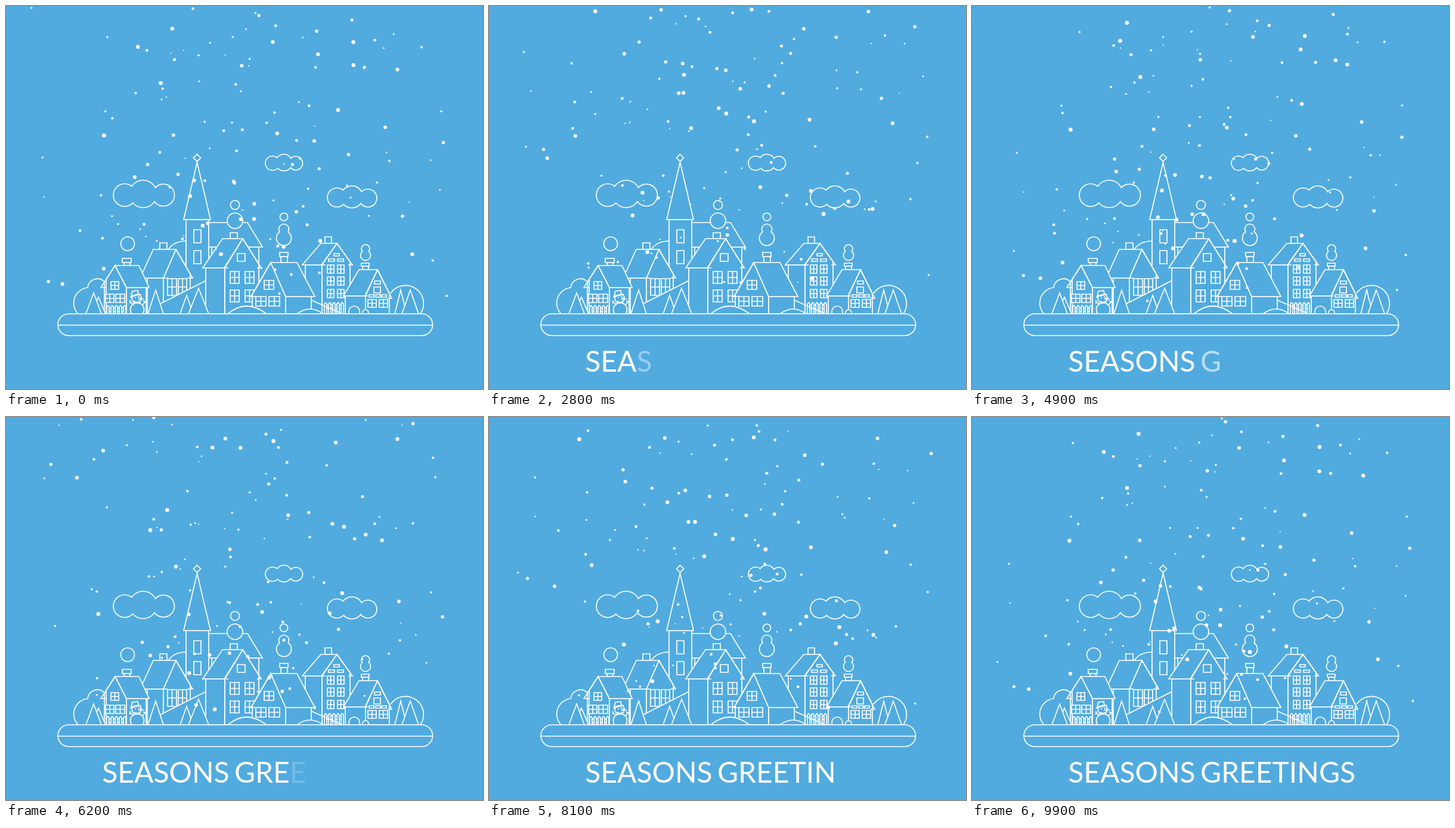
Recreate the animation shown at these times as an HTML page with a canvas. Size 800x642 px, loop 10 s.

```html
<!DOCTYPE html>
<html lang="en">
<head>
<meta charset="utf-8">
<title>Snowy village</title>
<style>
html, body { margin: 0; width: 100%; height: 100%; overflow: hidden; background: #51abdf; }
canvas { display: block; }
</style>
</head>
<body>
<canvas id="stage" width="800" height="642"></canvas>
<script>
const SKY = '#51abdf', LOOP = 10000, STEP = 100, LINE = 1.7;
const ctx = document.getElementById('stage').getContext('2d');
const scene = document.createElement('canvas');
scene.width = 800;
scene.height = 642;
const art = scene.getContext('2d');

// Filled with sky so that nearer shapes hide those behind them
function shape(d) {
  const path = new Path2D(d);
  art.fill(path);
  art.stroke(path);
}
const line = d => art.stroke(new Path2D(d));
const box = (x, y, w, h) => shape(`M${x} ${y}h${w}v${h}h${-w}z`);
function pane(x, y, w, h) {
  box(x, y, w, h);
  line(`M${x + w / 2} ${y}v${h}M${x} ${y + h / 2}h${w}`);
}
function dot(c, x, y, r) {
  c.beginPath();
  c.arc(x, y, r, 0, 7);
  c.fill();
}
// Outline around the union of several circles
function puff(...circles) {
  for (const [color, grow] of [['#fff', LINE / 2], [SKY, -LINE / 2]]) {
    art.fillStyle = color;
    for (const [x, y, r] of circles) dot(art, x, y, r + grow);
  }
}
const tree = (x, y, w) => shape(`M${x - w} 516L${x} ${y}L${x + w} 516`);
function fence(x, y, count) {
  line(`M${x} ${y + 4}h${count * 7 - 2}M${x} ${y + 10}h${count * 7 - 2}`);
  for (let i = 0; i < count; i++) shape(`M${x + i * 7} 516V${y + 2}l2 -2l2 2V516`);
}

function drawChurch() {
  shape('M272 408Q282 394 302 394V440H272');
  shape('M345 404V516H424V404z');
  shape('M338 363H405L430 404H338z');
  box(302, 358, 38, 158);
  shape('M320.5 262L343 358H298z');
  shape('M320.5 248.5L326.5 254.5L320.5 260.5L314.5 254.5z');
  box(315, 375, 12, 22);
  box(315, 410, 12, 22);
}

function drawBarn() {
  box(258, 397, 12, 11);
  box(237, 456, 27, 60);
  shape('M264 516V456L285 408L309 449V516z');
  shape('M247 408H285L264 456H225z');
  line('M285 408L313 456H304M264 456H271');
  pane(271, 457, 15, 28);
  pane(289, 457, 14, 28);
  shape('M257 500L336 460V516H250');
}

function drawTownHouse() {
  box(376, 380, 12, 10);
  box(335, 439, 32, 77);
  shape('M367 516V439L397 390L424 432.700V516z');
  shape('M363 390H397L366 439H330z');
  line('M397 390L428 439H421M366 439H373');
  box(388, 415, 13, 13);
  for (const y of [445, 476]) {
    pane(376, y, 15, 20);
    pane(401, y, 15, 20);
  }
}

function drawTallHouse() {
  box(535, 387, 11, 11);
  box(502, 434, 28, 82);
  shape('M530 516V434L555 398L577 428.5V516z');
  shape('M528 398H555L529 434H497z');
  line('M555 398L581 434H574M529 434H536');
  box(550, 415, 9, 4);
  box(541, 424, 10, 4);
  box(556, 424, 10, 4);
  for (const y of [434, 454, 475]) {
    pane(539, y, 11, 14);
    pane(556, y, 11, 14);
  }
  fence(534, 497, 5);
}

function drawCottage() {
  shape('M413 516V483.5L444 430L469 487V516z');
  box(469, 487, 43, 29);
  box(461, 420, 11, 10);
  box(459, 413, 14, 7);
  shape('M444 430H488L518 487H469z');
  line('M444 430L411 487H418');
  pane(433, 460, 16, 15);
  pane(419, 487, 17, 16);
  pane(441, 487, 18, 16);
}

function drawSnowHouse() {
  shape('M168 516V458L183 435L202 472V516z');
  box(202, 472, 33, 44);
  box(198, 430, 10, 5);
  box(195, 423, 15, 7);
  shape('M183 435H223L240 472H202z');
  line('M183 435L159 472H168');
  pane(176, 462, 13, 13);
  pane(167, 483, 14, 14);
  pane(184, 483, 15, 14);
  fence(169, 502, 5);
}

function drawSnowman() {
  shape('M211 516A11.5 11.5 0 1 1 229 516');
  line('M214 501L208 495M208 499V493M229 501L234 495M230 494L235 497');
  shape('M211 490A8 8 0 1 0 227 490A8 8 0 1 0 211 490');
  shape('M210 486L212 478L221 477L222 483z');
  line('M208 488L226 483M222 489L229 491L222 492M215 495Q220 498 225 495');
  art.fillStyle = '#fff';
  dot(art, 217, 489, 1);
  dot(art, 222, 487, 1);
  art.fillStyle = SKY;
}

function drawRightHouse() {
  box(569, 486, 34, 30);
  shape('M603 516V486L623 442L643 482V516z');
  box(598, 436, 10, 6);
  box(596, 431, 13, 5);
  shape('M592 442H623L602 486H566z');
  line('M623 442L647 490H640M602 486H607');
  box(618, 461, 10, 5);
  box(617, 471, 11, 10);
  for (const x of [609, 620, 630]) box(x, 484, 8, 4);
  pane(607, 492, 14, 13);
  pane(626, 492, 14, 13);
  shape('M575 516V512A9 9 0 0 1 593 512V516');
  shape('M598 516V514A5 5 0 0 1 608 514V516');
}

function drawScene() {
  art.fillStyle = SKY;
  art.fillRect(0, 0, 800, 642);
  art.strokeStyle = '#fff';
  art.lineWidth = LINE;

  shape('M121 516A26 26 0 0 1 137 472A16.5 16.5 0 0 1 165 462V516');
  shape('M645 481.5A30 30 0 0 1 695 516');
  drawChurch();
  drawBarn();
  drawTownHouse();
  drawTallHouse();
  shape('M512 493L564 516');
  drawCottage();
  drawSnowHouse();
  drawSnowman();
  drawRightHouse();

  tree(155, 488, 12);
  tree(147, 481, 13);
  tree(251, 476, 13);
  tree(303, 485, 11);
  tree(323, 473, 17);
  tree(662, 476, 10);
  tree(678, 476, 14);
  shape('M372 516Q403 490 437 516');
  shape('M488 516Q510 500 532 516');

  art.beginPath();
  art.roundRect(87, 516, 628.5, 36.5, 18.25);
  art.fill();
  art.stroke();
  line('M87 535H715');

  puff([199, 317, 19], [230, 315, 23], [264, 317, 18.5]);
  puff([447, 263.5, 12], [466, 262.5, 14], [486, 263.5, 11.5]);
  puff([555, 321, 16], [580, 320, 18.5], [607, 322, 15]);
  puff([204, 398.5, 11.5]);
  puff([384, 333.5, 7.5]);
  puff([384, 360, 13]);
  puff([466, 353.5, 6.5]);
  puff([466, 374, 8.5], [466, 389, 12.5]);
  puff([603, 407, 7], [603, 418, 8.5]);
}

let seed = 24;
function rand() {
  seed = (seed * 16807) % 2147483647;
  return seed / 2147483647;
}
const flakes = Array.from({ length: 132 }, () => ({
  x: (rand() + rand()) * 410 - 8,
  fall: 400 + rand() * 115,
  start: rand(),
  sway: rand() * 2 * Math.PI,
  r: 1 + rand() * 2.4
}));

function drawSnow(p) {
  ctx.fillStyle = '#fff';
  for (const f of flakes) {
    const y = (f.start + 2 * p) % 1 * f.fall;
    dot(ctx, f.x + 14 * Math.sin(2 * Math.PI * p + f.sway), y, f.r);
  }
}

// Letters fade in one after another, half a second each
const message = 'SEASONS GREETINGS';
function drawText(t) {
  ctx.font = '48px Lato, sans-serif';
  ctx.fontKerning = 'none';
  ctx.wordSpacing = '-4px';
  let begin = 1100;
  [...message].forEach((ch, i) => {
    if (ch === ' ') return;
    const x = 161.2 + ctx.measureText(message.slice(0, i)).width;
    ctx.globalAlpha = Math.max(0, Math.min(1, (t - begin) / 500));
    ctx.fillText(ch, x, 613);
    begin += 500;
  });
  ctx.globalAlpha = 1;
}

function draw(now) {
  const t = Math.floor(now % LOOP / STEP) * STEP;
  ctx.drawImage(scene, 0, 0);
  drawSnow(t / LOOP);
  drawText(t);
  requestAnimationFrame(draw);
}

drawScene();
draw(0);
</script>
</body>
</html>
```
